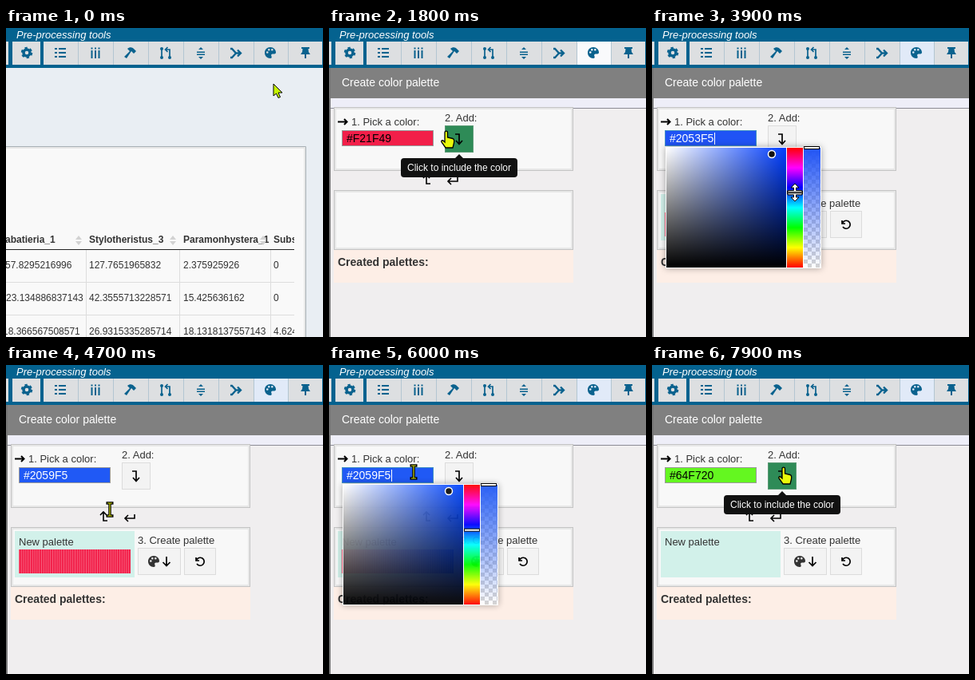
An HTML page for the animation above (8 s loop, 397 by 387 pixels).

```html
<!DOCTYPE html>
<html lang="en">
<head>
<meta charset="utf-8">
<title>Create color palette</title>
<style>
html, body { margin: 0; width: 100%; height: 100%; overflow: hidden; }
svg { display: block; font: 13px "Liberation Sans", Arial, sans-serif; fill: #333; }
.line { fill: none; stroke: currentColor; stroke-width: 2; }
.tip rect, .tip path { fill: #111; }
.tip text { fill: #fff; font-size: 12px; text-anchor: middle; }
.btn { fill: #f3f3f3; stroke: #dcdcdc; }
.card { fill: #f8f8f8; stroke: #c4c4c4; }
.inset { fill: none; stroke: #000; stroke-opacity: .07; stroke-width: 2; }
.small { font-size: 12px; }
.bold { font-weight: bold; }
</style>
</head>
<body>
<svg width="397" height="387" viewBox="0 0 397 387">
  <defs>
    <path id="pal" fill-rule="evenodd" d="M0-7C-4-7-7-4-7 0S-4 7 0 7C2 7 2 5 1.300 4C.5 2 2 1.500 4 1.500C6 1.500 7 1 7-.5C7-4 4-7 0-7ZM-5-.5a1.300 1.300 0 1 0 2.600 0a1.300 1.300 0 1 0-2.600 0ZM-3-3.800a1.300 1.300 0 1 0 2.600 0a1.300 1.300 0 1 0-2.600 0ZM1-3.800a1.300 1.300 0 1 0 2.600 0a1.300 1.300 0 1 0-2.600 0Z"/>
    <path id="sort" d="M-4-1L0-6L4-1ZM-4 1L0 6L4 1Z" fill="#d2d2d2"/>
    <linearGradient id="white"><stop stop-color="#fff"/><stop offset="1" stop-color="#fff" stop-opacity="0"/></linearGradient>
    <linearGradient id="black" x2="0" y2="1"><stop stop-opacity="0"/><stop offset="1"/></linearGradient>
    <linearGradient id="hues" x2="0" y2="1"></linearGradient>
    <linearGradient id="fade" x2="0" y2="1"><stop id="solid"/><stop id="clear" offset="1" stop-opacity="0"/></linearGradient>
    <linearGradient id="ramp"><stop stop-color="#f21f49"/><stop id="rampEnd" offset="1"/></linearGradient>
    <pattern id="check" width="10" height="10" x="190" y="150" patternUnits="userSpaceOnUse"><path fill="#fff" d="M0 0h10v10H0Z"/><path fill="#d4d4d4" d="M0 0h5v5H0ZM5 5h5v5H5Z"/></pattern>
    <pattern id="bars" width="2.800" height="31" x="16" patternUnits="userSpaceOnUse"><path d="M0 0h.8v31H0Z" fill="#fff" fill-opacity=".33"/></pattern>
    <clipPath id="cells"><path d="M0 150H361V387H0Z"/></clipPath>
  </defs>

  <g id="table">
    <rect width="397" height="387" fill="#e9eef3"/>
    <path d="M-2 148.500H375.500V390H-2Z" fill="#f9f9f9" stroke="#a8b0b5"/>
    <path d="M0 150H374V387" class="inset"/>
    <path d="M0 318.500H361M0 359.500H361M100.500 278V387M217.500 278V387M331.500 278V387" fill="none" stroke="#ddd"/>
    <path d="M0 277.500H361" stroke="#222"/>
    <g id="rows" class="small" clip-path="url(#cells)"></g>
    <use href="#sort" x="91" y="266"/><use href="#sort" x="209" y="266"/><use href="#sort" x="322" y="266"/>
  </g>

  <g id="panel">
    <rect width="397" height="387" fill="#f0eeef"/>
    <rect y="88" width="397" height="12" fill="#eeeef8"/>
    <path d="M0 100.500H397" stroke="#8c8c96"/>
    <rect y="50" width="397" height="38" fill="#808080"/>
    <path d="M1 50V387" stroke="#777" stroke-width="2"/>
    <text x="16" y="73" font-size="14" style="fill:#fff">Create color palette</text>
    <rect class="card" x="6.500" y="99.500" width="299" height="79"/><rect class="inset" x="8" y="101" width="296" height="76"/>
    <rect class="card" x="6.500" y="203.500" width="299" height="74"/><rect class="inset" x="8" y="205" width="296" height="71"/>
    <rect x="6" y="278" width="300" height="41" fill="#fdeee6"/>
    <text x="11" y="298" class="bold" font-size="14">Created palettes:</text>
    <path class="line" d="M11 117.500H22M19 114L22.500 117.500L19 121"/>
    <text x="28" y="122">1. Pick a color:</text>
    <text x="145" y="117">2. Add:</text>
    <path class="line" stroke-width="1.500" d="M127 195H122V184M118 188L122 184L126 188M161 187V192H149M153 188L149 192L153 196" style="stroke-width:1.600"/>
    <rect id="field" x="16.500" y="128.500" width="114" height="19"/>
    <text id="hex" x="22" y="143" font-size="14"></text>
    <path id="caret" d="M78.500 131V146" stroke="#000"/>
    <rect id="add" x="145.500" y="122.500" width="35" height="33"/>
    <path class="line" d="M158 133H163V145M159 141L163 145.500L167 141" style="stroke-width:1.700"/>
    <g id="created">
      <rect x="11" y="208" width="150" height="58" fill="#d2f1ea"/>
      <text x="16" y="226">New palette</text>
      <g id="swatch"><rect x="16" y="231" width="140" height="30" fill="url(#ramp)"/><rect x="16" y="231" width="140" height="30" fill="url(#bars)"/></g>
      <text x="165" y="224">3. Create palette</text>
      <rect class="btn" x="165.500" y="229.500" width="53" height="33"/>
      <rect class="btn" x="223.500" y="229.500" width="39" height="33"/>
      <use href="#pal" x="185" y="246"/>
      <path class="line" d="M201 240V251M196.500 247L201 251.500L205.500 247M238 241V245H242M238.500 244.500A5 5 0 1 1 239 249" style="stroke-width:1.700"/>
    </g>
  </g>

  <g id="toolbar">
    <rect width="397" height="50" fill="#04628f"/>
    <path d="M0 17H3V46H0ZM8 17H43V46H8ZM47 17H396V46H47Z" fill="#dddfe1"/>
    <rect id="tool" x="311" y="17" width="42" height="29"/>
    <path id="seps" stroke="#b3c6d2"/>
    <text x="13" y="13" font-style="italic" style="fill:#fff">Pre-processing tools</text>
    <g fill="#0a628e" color="#0a628e">
      <circle cx="26" cy="31" r="4" class="line" style="stroke-width:3.500"/>
      <circle cx="26" cy="31" r="6" class="line" stroke-dasharray="3.140" style="stroke-width:2.500"/>
      <path class="line" d="M61 26H64M61 31H64M61 36H64M66 26H75M66 31H75M66 36H75"/>
      <path class="line" d="M107.500 28V38M112 28V38M116.500 28V38M106.500 25.500H108.500M111 25.500H113M115.500 25.500H117.500"/>
      <path d="M152 26C155 23 159 24 161 27L163 29L160 32L157 29L151 38L148 36L155 29Z"/>
      <path class="line" d="M195 27V36M205 36V27H200M202.500 24L199.500 27L202.500 30" style="stroke-width:1.700"/>
      <circle cx="195" cy="26" r="2"/><circle cx="195" cy="37" r="2"/><circle cx="205" cy="37" r="2"/>
      <path d="M239 29.500H249V31H239ZM239 32.500H249V34H239ZM241 27L244 24L247 27ZM241 36L244 39L247 36Z"/>
      <path class="line" d="M281 26H283L288 31.500H294M281 37H283L288 31.500M290 27.500L294 31.500L290 35.500" style="stroke-width:2.300"/>
      <use href="#pal" x="331" y="31"/>
      <path d="M370 24H380V26H378.500L379 30L381 33H369L371 30L371.500 26H370ZM374 33H376V38H374Z"/>
    </g>
  </g>

  <g class="tip" id="toolTip"><rect x="295" y="-12" width="79" height="23" rx="4"/><path d="M329 11H339L334 16Z"/><text x="334" y="4">New palette</text></g>
  <g class="tip" id="fieldTip"><rect x="8" y="150" width="130" height="23" rx="4"/><path d="M68 150H78L73 145Z"/><text x="73" y="166">Click to select a color</text></g>
  <g class="tip" id="addTip"><rect x="90" y="163" width="146" height="24" rx="4"/><path d="M158 163H168L163 158Z"/><text x="163" y="179">Click to include the color</text></g>

  <g id="picker">
    <rect x="17" y="149" width="195" height="152" fill="#fff" style="filter:drop-shadow(0 0 4px #0005)"/>
    <rect id="grid" x="18" y="150" width="150" height="150"/>
    <rect x="18" y="150" width="150" height="150" fill="url(#white)"/>
    <rect x="18" y="150" width="150" height="150" fill="url(#black)"/>
    <rect x="169" y="150" width="20" height="150" fill="url(#hues)"/>
    <rect x="190" y="150" width="21" height="150" fill="url(#check)"/>
    <rect x="190" y="150" width="21" height="150" fill="url(#fade)"/>
    <circle cx="150" cy="158" r="4.500" fill="#111" stroke="#fff" stroke-width="1.500"/>
    <rect x="190.500" y="148.500" width="19" height="3" fill="#fff" stroke="#000"/>
    <rect id="knob" x="169.500" width="19" height="3" fill="#fff" stroke="#000"/>
  </g>

  <g id="cursor">
    <path id="arrow" d="M0 0V15L3.500 12L6 17.500L8.500 16.500L6 11H11Z" fill="#c6f500" stroke="#000"/>
    <path id="hand" d="M-2 1C-2-1.500 1.500-1.500 1.500 1V7L8 8.500C10 9 10 11 9.500 14L8 20H-1L-6 13C-7 11-5 10-3.500 11.500L-2 13Z" fill="#e9f90a" stroke="#000" stroke-width="1.300"/>
    <g id="beam" fill="none"><path d="M-4.500-8H4.500M-4.500 8H4.500M0-8V8" stroke="#000" stroke-width="3.500"/><path d="M-3-8H3M-3 8H3M0-8V8" stroke="#c9d400" stroke-width="1.200"/></g>
    <path id="resize" d="M-9-2.500H-1.500V-6H-5L0-11L5-6H1.500V-2.500H9V-.5H-9ZM-9 1H9V3H1.500V6H5L0 11L-5 6H-1.500V3H-9Z" fill="#fff" stroke="#000"/>
    <path id="cross" d="M-8 0H8M0-8V8" stroke="#000" stroke-width="1.500"/>
  </g>
</svg>
<script>
const $ = id => document.getElementById(id);
const show = (id, on) => $(id).style.display = on ? '' : 'none';
const set = (id, attrs) => { for (const k in attrs) $(id).setAttribute(k, attrs[k]); };

const columns = [
  [0, 'abatieria_1', '57.8295216996', '23.134886837143', '18.366567508571'],
  [104, 'Stylotheristus_3', '127.7651965832', '42.3555713228571', '26.9315335285714'],
  [222, 'Paramonhystera_1', '2.375925926', '15.425636162', '18.1318137557143'],
  [335, 'Subsphaer_1', '0', '0', '4.62414285']
];
$('rows').innerHTML = columns.map(([x, ...cells]) => cells.map((s, i) =>
  `<text x="${x || [-1, -1, 0, -4][i]}" y="${[269, 301, 342, 384][i]}"${i ? '' : ' class="bold"'}>${s}</text>`).join('')).join('');
$('hues').innerHTML = [0, 1, 2, 3, 4, 5, 6].map(i =>
  `<stop offset="${i / 6}" stop-color="hsl(${360 - i * 60} 100% 50%)"/>`).join('');
set('seps', { d: [90, 134, 178, 222, 266, 310, 353].map(x => `M${x}.5 17V46`).join('') });

// time, x, y
const path = [
  [0, 335, 70], [300, 331, 28], [900, 331, 28], [1500, 112, 138], [1800, 147, 130], [2000, 147, 130],
  [2400, 107, 142], [2900, 107, 142], [3400, 179, 155], [3800, 179, 205], [3900, 179, 206], [4300, 179, 206],
  [4500, 221, 204], [4700, 130, 181], [5200, 160, 130], [5300, 160, 130], [5800, 106, 134], [6000, 106, 134],
  [6400, 179, 207], [6800, 179, 258], [7000, 179, 258], [7200, 221, 225], [7600, 165, 129], [8000, 165, 129]
];
// time, height of the hue knob
const hueTrack = [[0, 155], [3400, 155], [3800, 205], [3900, 206], [4000, 206], [4200, 206.7], [6400, 206.7], [6800, 257], [6900, 257.9], [8000, 257.9]];

function at(track, t) {
  const i = Math.max(1, track.findIndex(k => k[0] >= t)), [t0, ...a] = track[i - 1], [t1, ...b] = track[i];
  const u = (t - t0) / (t1 - t0), e = u * u * (3 - 2 * u);
  return a.map((v, k) => v + (b[k] - v) * e);
}

function hsv(h, s, v) {
  const f = n => { const k = (n + h / 60) % 6; return v - v * s * Math.max(0, Math.min(k, 4 - k, 1)); };
  return '#' + [5, 3, 1].map(n => Math.round(f(n) * 255).toString(16).padStart(2, '0')).join('').toUpperCase();
}

function draw(t) {
  const within = (a, b) => t >= a && t < b;
  const [x, y] = at(path, t), [knobY] = at(hueTrack, t);
  const hue = 360 * (1 - (knobY - 150) / 150);
  const color = t <= 3400 ? '#F21F49' : within(4200, 6401) ? '#2059F5' : t >= 6900 ? '#64F720' : hsv(hue, .87, .96);
  const ink = hue > 200 && hue < 290 ? '#fff' : '#000';
  const open = within(2500, 4500) || within(6000, 7200);
  const inside = (l, r, top, bottom) => x >= l && x <= r && y >= top && y <= bottom;
  const onAdd = t >= 800 && !open && inside(145, 181, 122, 156);

  show('table', t < 800);
  show('panel', t >= 800);
  show('toolTip', within(200, 1000));
  show('fieldTip', within(1400, 1600) || within(2400, 3000) || within(5700, 6000));
  show('addTip', within(1700, 2200) || within(5100, 5500) || t >= 7500);
  set('tool', { fill: t < 200 ? '#dddfe1' : t < 1900 ? '#f9fafc' : '#e1eaf8' });

  set('field', { fill: color, stroke: open ? '#3f8fc4' : '#999' });
  $('hex').textContent = color;
  $('hex').style.fill = ink;
  set('caret', { stroke: ink });
  show('caret', open);
  set('add', { fill: onAdd ? '#2e8b57' : '#f3f3f3', stroke: onAdd ? '#5c9a76' : '#dcdcdc' });
  show('created', t >= 2000 && !within(7800, 7900));
  show('swatch', within(2100, 7800));
  set('rampEnd', { 'stop-color': t < 5500 ? '#f21f49' : '#2059f5' });

  show('picker', open);
  set('picker', { opacity: within(2500, 2600) ? .7 : within(6000, 6100) ? .95 : within(4400, 4500) || within(7100, 7200) ? .5 : 1 });
  set('grid', { fill: hsv(hue, 1, 1) });
  set('solid', { 'stop-color': color });
  set('clear', { 'stop-color': color });
  set('knob', { y: knobY - 1.5 });

  const kind = onAdd || inside(311, 353, 17, 46) ? 'hand'
    : open && inside(168, 190, 149, 301) ? 'resize'
    : open && inside(17, 168, 149, 301) ? 'cross'
    : t >= 800 && (inside(16, 131, 128, 148) || inside(100, 165, 165, 200)) ? 'beam' : 'arrow';
  for (const k of ['arrow', 'hand', 'beam', 'resize', 'cross']) show(k, k === kind);
  set('cursor', { transform: `translate(${Math.round(x)} ${Math.round(y)})` });
}

const start = performance.now();
function tick() {
  const t = (performance.now() - start) % 8000;
  draw(Math.floor(t / 100) * 100);
  requestAnimationFrame(tick);
}
tick();
</script>
</body>
</html>
```
